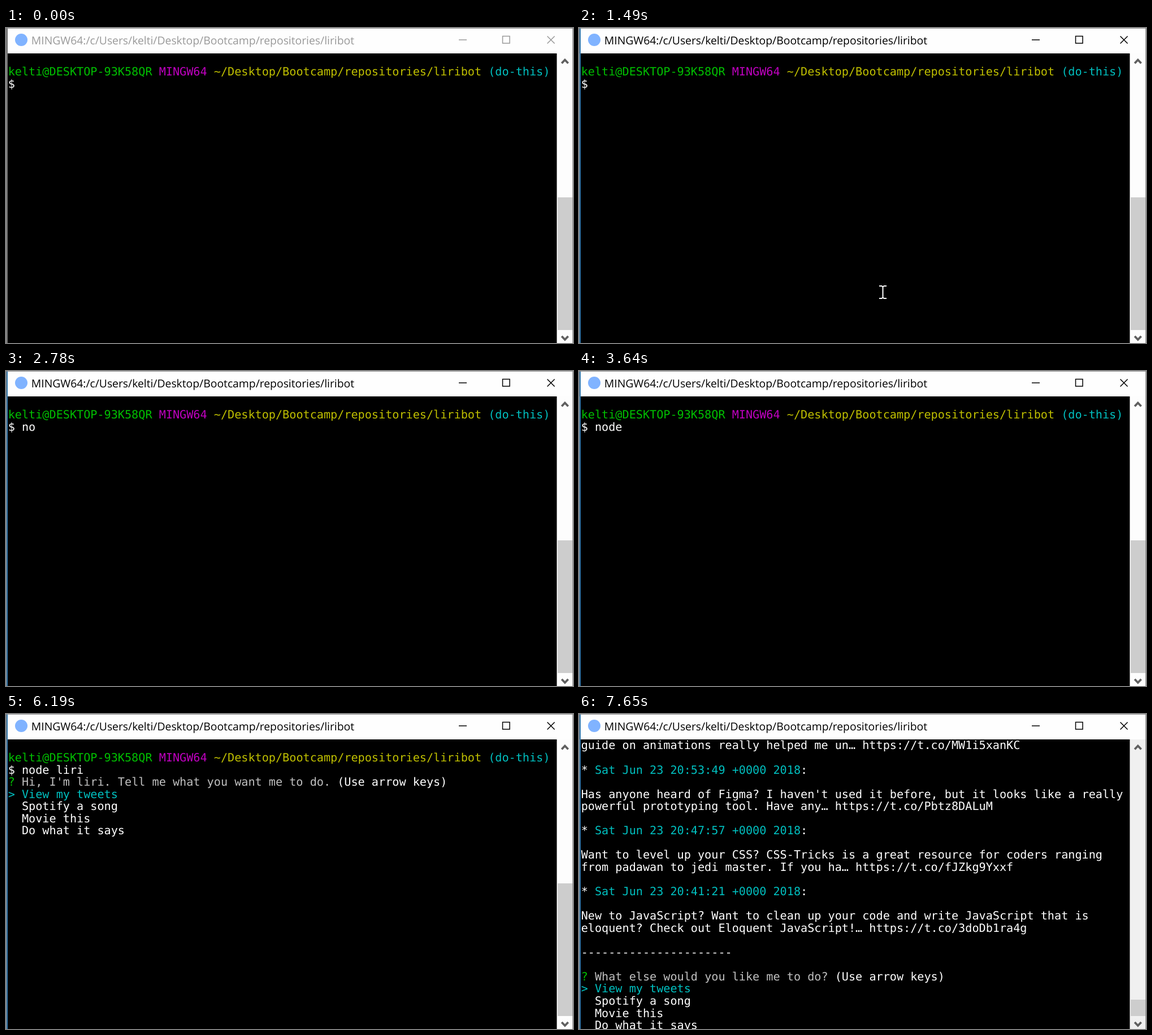
These frames come from a looping animation (1003 by 558 pixels, 8000 ms). An HTML page:

```html
<!DOCTYPE html>
<html lang="en">
<head>
<meta charset="utf-8">
<title>Terminal</title>
<style>
  html, body { margin: 0; width: 100%; height: 100%; overflow: hidden; background: #000; }
  svg { display: block; width: 1003px; height: 558px; }
  text { white-space: pre; text-rendering: geometricPrecision; }
  #title { font: 19.33px "Open Sans", "Noto Sans", sans-serif; fill: var(--ink); }
  #screen { font: 20.16px "DejaVu Sans Mono", monospace; }
  #buttons { fill: none; stroke: var(--ink); stroke-width: 1.5; }
  #arrows { fill: none; stroke: #606060; stroke-width: 3.8; }
  #pointer { fill: none; stroke: #fff; stroke-width: 2; }
</style>
</head>
<body>
<svg id="stage" viewBox="0 0 1003 558">
  <rect width="1003" height="558" fill="#8a8a8a"/>
  <rect id="edge" x="1" y="1" width="2" height="557"/>
  <rect x="3" y="1" width="999" height="44" fill="#fefefe"/>
  <rect x="3" y="45" width="971.5" height="513" fill="#000"/>
  <rect id="track" x="974.5" y="45" width="27.5" height="513"/>
  <rect id="thumb" x="976" width="26" fill="#cdcdcd"/>
  <circle cx="27" cy="21" r="11" fill="#80b3ff"/>
  <text id="title" x="44.8" y="28.5">MINGW64:/c/Users/kelti/Desktop/Bootcamp/repositories/liribot</text>
  <g id="buttons">
    <path d="M801 21H815"/>
    <rect x="878.5" y="14.5" width="12.5" height="12.5"/>
    <path d="M957.5 14.5L970.5 27.5M970.5 14.5L957.5 27.5"/>
  </g>
  <g id="arrows">
    <path d="M983 62.5L988.7 56.5L994.5 62.5"/>
    <path d="M983 546L988.7 552L994.5 546"/>
  </g>
  <g id="screen"></g>
  <rect id="block" x="3" y="197" width="12.5" height="21.5" fill="#ff80c0"/>
  <path id="pointer" d="M-6.5 -11H-2L0 -9.5L2 -11H6.5M0 -10V10M-6.5 11H-2L0 9.5L2 11H6.5"/>
</svg>
<script>
const LOOP = 8000;
const CELL = { x: 3.7, y: 84, height: 21.55 };
const INK = { w: '#fff', g: '#00c000', m: '#c000c0', y: '#c0c000', c: '#00c0c0', s: '#c0c0c0' };
const byId = id => document.getElementById(id);

// "^" plus a letter switches the ink
const prompt = '^gkelti@DESKTOP-93K58QR ^mMINGW64 ^y~/Desktop/Bootcamp/repositories/liribot ^c(do-this)';
const question = "^g? ^sHi, I'm liri. Tell me what you want me to do. ";
const hint = '^w(Use arrow keys)';
const choices = ['^c> View my tweets', '  Spotify a song', '  Movie this', '  Do what it says'];
const stamp = time => `* ^cSat Jun 23 ${time} +0000 2018^w:`;
const command = [prompt, '$ node liri'];

const menu = [...command, question + hint, ...choices];
const loading = [...command, question + '^cView my tweets', '', '^cHere are your tweets'];
const tweets = [
  'guide on animations really helped me un… https://t.co/MW1i5xanKC', '',
  stamp('20:53:49'), '',
  "Has anyone heard of Figma? I haven't used it before, but it looks like a really",
  'powerful prototyping tool. Have any… https://t.co/Pbtz8DALuM', '',
  stamp('20:47:57'), '',
  'Want to level up your CSS? CSS-Tricks is a great resource for coders ranging',
  'from padawan to jedi master. If you ha… https://t.co/fJZkg9Yxxf', '',
  stamp('20:41:21'), '',
  'New to JavaScript? Want to clean up your code and write JavaScript that is',
  'eloquent? Check out Eloquent JavaScript!… https://t.co/3doDb1ra4g', '',
  '-'.repeat(22), '',
  '^g? ^sWhat else would you like me to do? ' + hint,
  ...choices
];

const typing = [[0, ''], [2780, 'no'], [3490, 'nod'], [3640, 'node'],
  [4450, 'node li'], [4700, 'node lir'], [4850, 'node liri']];
const screens = [
  ...typing.map(([at, typed]) => [at, { lines: [prompt, '$ ' + typed] }]),
  [6190, { lines: menu }],
  [7370, { lines: loading, block: true }],
  [7650, { lines: tweets, firstRow: -1, scrolled: true }]
];
const pointerSteps = [[0, null], [1220, [540.5, 474.5]], [1370, [539.5, 472]],
  [1490, [537.5, 468]], [1610, [537.5, 467]], [1730, [537.5, 466]], [1850, null]];
const focusSteps = [[0, false], [1370, true]];

const stepAt = (steps, t) => steps.findLast(([at]) => at <= t)[1];
const show = (id, on) => byId(id).setAttribute('visibility', on ? 'visible' : 'hidden');

function svg(tag, attrs, text = '') {
  const node = document.createElementNS('http://www.w3.org/2000/svg', tag);
  for (const key in attrs) node.setAttribute(key, attrs[key]);
  node.textContent = text;
  return node;
}

function makeLine(line, row) {
  const text = svg('text', { x: CELL.x, y: CELL.y + row * CELL.height });
  const marked = line.startsWith('^') ? line : '^w' + line;
  for (const run of marked.split('^').slice(1)) {
    text.append(svg('tspan', { fill: INK[run[0]] }, run.slice(1)));
  }
  return text;
}

function drawScreen({ lines, firstRow = 0, scrolled = false, block = false }) {
  byId('screen').replaceChildren(...lines.map((line, i) => makeLine(line, firstRow + i)));
  const top = scrolled ? 506 : 300;
  byId('thumb').setAttribute('y', top);
  byId('thumb').setAttribute('height', 535 - top);
  byId('track').setAttribute('fill', scrolled ? '#f0f0f0' : '#fdfdfd');
  show('block', block);
}

function drawFocus(focused) {
  byId('stage').style.setProperty('--ink', focused ? '#000' : '#999');
  byId('edge').setAttribute('fill', focused ? '#3478ac' : '#707070');
}

function drawPointer(place) {
  show('pointer', place);
  if (place) byId('pointer').setAttribute('transform', `translate(${place})`);
}

const tracks = [[screens, drawScreen], [focusSteps, drawFocus], [pointerSteps, drawPointer]];
const shown = [];

function frame() {
  const t = performance.now() % LOOP;
  tracks.forEach(([steps, draw], i) => {
    const state = stepAt(steps, t);
    if (state !== shown[i]) draw(shown[i] = state);
  });
  requestAnimationFrame(frame);
}
frame();
</script>
</body>
</html>
```
